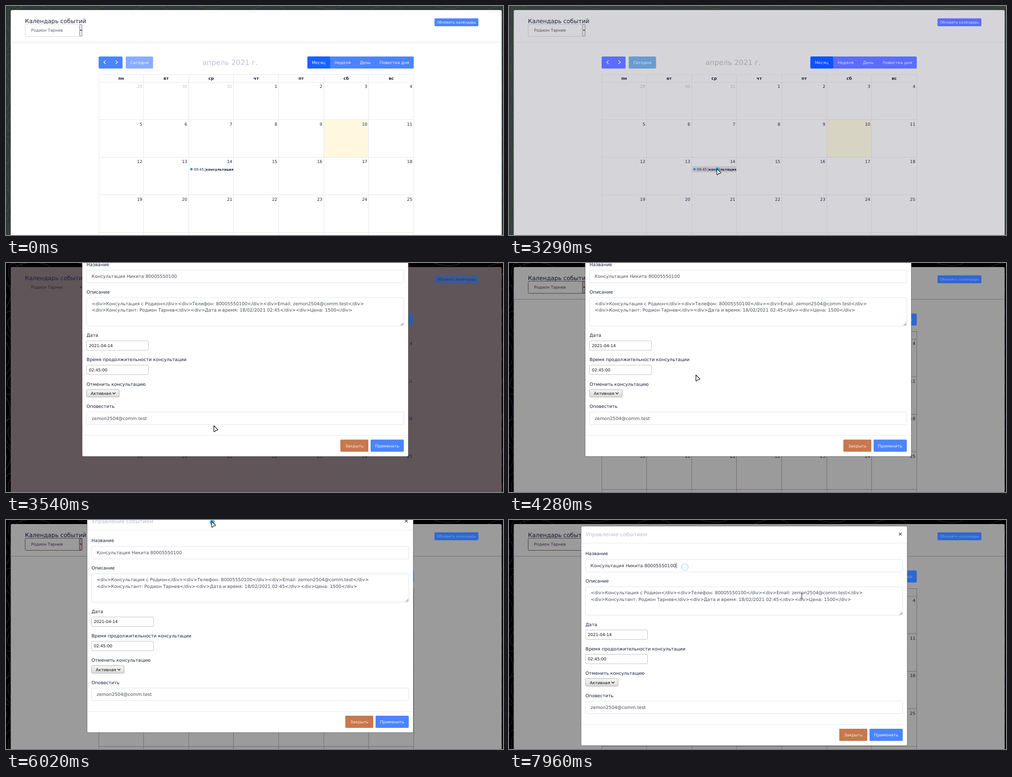
Animation, 1100 px wide and 509 px high, one loop 8000 ms. Source, as an HTML page:

```html
<!DOCTYPE html>
<html lang="ru">
<head>
<meta charset="utf-8">
<title>Календарь событий</title>
<style>
  html, body { margin: 0; width: 100%; height: 100%; overflow: hidden; background: #000; }
  svg { display: block; width: 1100px; height: 509px; }
  text { font-family: "DejaVu Sans", sans-serif; text-rendering: geometricPrecision; white-space: pre; }
  .mid { text-anchor: middle; }
  .end { text-anchor: end; }
  .bold { font-weight: bold; }
</style>
</head>
<body>
<svg id="stage" viewBox="0 0 1100 509"></svg>
<script>
const LOOP = 8000;
const stage = document.getElementById('stage');

const rect = (x1, y1, x2, y2, fill, rest = '') =>
  `<rect x="${x1}" y="${y1}" width="${x2 - x1}" height="${y2 - y1}" fill="${fill}" ${rest}/>`;
const text = (x, y, size, fill, str, rest = '') =>
  `<text x="${x}" y="${y}" font-size="${size}" fill="${fill}" ${rest}>${str.replace(/</g, '&lt;')}</text>`;
const line = (d, stroke, width = 1, rest = '') =>
  `<path d="${d}" fill="none" stroke="${stroke}" stroke-width="${width}" ${rest}/>`;
const range = n => [...Array(n).keys()];

// Page colours as the backdrop fades in
const KEYS = ['bg', 'topo', 'card', 'line', 'text', 'muted', 'btn', 'active', 'off', 'today', 'btext', 'sel', 'box', 'edge', 'knob', 'hover'];
const palette = list => list.split(' ').map(c => '#' + c);
const day = palette('2d3a3a 4c522e ffffff e4e6ee 1c2440 bcc2d4 4c84ff 1a62ff 89adff fff8df eef3ff 555a6a d3d6df 8c8f99 e6e6e8 dedee0');
const dusk = palette('35403f 3f5236 d5d5d9 c5c5cb 1f2440 a2a3a9 596dff 0a52ff 6a9bd0 d7d4c3 d5dcff 4b4c55 b4b4bb 85858c cfcfd3 c4c0c6');
const murky = palette('000000 3a3a4e 605558 605558 1d1c48 4c4450 3a5a96 3a5a96 3a5a96 605558 1f355f 2d2530 605558 605558 605558 605558');
const night = palette('000000 2f2d4a 9b9b9b 75676b 10132e 777777 2d68d2 2258c0 5a8bd0 9b968a 7c9fda 33243c 453c44 453c44 8a7b82 8c8a8d');

function contours() {
  const ring = (cx, cy, rx, ry, tilt) =>
    `<ellipse cx="${cx}" cy="${cy}" rx="${rx}" ry="${ry}" transform="rotate(${tilt} ${cx} ${cy})"/>`;
  const side = range(9).map(i => range(2).map(j =>
    ring(i % 2 ? -12 : 16, 20 + i * 60, 11 + 9 * j, 20 + 14 * j, 25 * Math.sin(i * 2)))).flat();
  const top = range(9).map(i => ring(60 + i * 130, i % 2 ? -8 : 12, 38, 13, 8 * Math.sin(i * 3)));
  const right = range(7).map(i => ring(1106, 30 + i * 78, 8, 32, 10));
  return `<g fill="none" stroke="var(--topo)" stroke-width="0.9">${[...side, ...top, ...right].join('')}</g>`;
}

function page() {
  const colX = i => Math.floor(205 + 99.62 * i) + 0.5;
  const rowY = i => Math.floor(169 + 83.6 * i) + 0.5;
  const days = ['пн', 'вт', 'ср', 'чт', 'пт', 'сб', 'вс'];
  const grid = range(8).map(i => `M${colX(i)} 152.5V509`).join('') + 'M205 152.5H903' +
    range(5).map(i => `M205 ${rowY(i)}H903`).join('');
  const numbers = range(28).map(i => {
    const col = i % 7, row = Math.floor(i / 7);
    return text(301.6 + 99.62 * col, 182 + 83.6 * row, 9.2, i < 3 ? 'var(--muted)' : 'var(--text)',
      String(i < 3 ? 29 + i : i - 2), 'class="end"');
  });
  const tabs = [[692, 'Месяц'], [745, 'Неделя'], [795, 'День'], [859.5, 'Повестка дня']];
  return [
    rect(0, 0, 1100, 509, 'var(--bg)'), contours(),
    rect(10.5, 9, 1097, 520, 'var(--card)', 'rx="3"'),
    line('M10.5 80.5H1097', 'var(--line)'),
    text(42, 38.2, 12.9, 'var(--text)', 'Календарь событий'),
    rect(42.5, 40.5, 168.5, 67.5, 'var(--card)', 'rx="2" stroke="var(--box)"'),
    rect(162.5, 41.5, 168.5, 66.5, 'var(--knob)', 'rx="1" stroke="var(--edge)"'),
    '<path d="M163.7 52.8h4.4l-2.2 2.6z" fill="#111"/>',
    text(55.6, 57, 8.95, 'var(--sel)', 'Родион Тарнев'),
    rect(948.5, 27.5, 1045.5, 45, 'var(--btn)', 'rx="2"'),
    text(997, 39.2, 7.85, 'var(--btext)', 'Обновить календарь', 'class="mid"'),
    rect(205, 112.3, 258, 139, 'var(--btn)', 'rx="2.5"'),
    line('M220.5 121l-4 4l4 4M242.5 121l4 4l-4 4', 'var(--btext)', 1.6),
    rect(265, 112.3, 325.5, 139, 'var(--off)', 'rx="2.5"'),
    text(295.2, 128.6, 9.1, 'var(--btext)', 'Сегодня', 'class="mid"'),
    text(496, 131, 15.8, 'var(--muted)', 'апрель 2021 г.', 'class="mid"'),
    rect(667, 112.3, 902.5, 139, 'var(--btn)', 'rx="2.5"'),
    rect(667, 112.3, 717.5, 139, 'var(--active)', 'rx="2.5"'),
    ...tabs.map(([x, s]) => text(x, 128.6, 9.1, 'var(--btext)', s, 'class="mid"')),
    rect(colX(5), rowY(1), colX(6), rowY(2), 'var(--today)'),
    line(grid, 'var(--line)'),
    ...days.map((d, i) => text(254.8 + 99.62 * i, 163.9, 9.2, 'var(--text)', d, 'class="mid bold"')),
    ...numbers,
    '<clipPath id="cell"><path d="M404 350h98.8v30h-98.8z"/></clipPath><g clip-path="url(#cell)">',
    rect(405.3, 356, 506, 369.7, 'var(--hover)', 'id="hover" rx="2"'),
    '<circle cx="410.4" cy="362.7" r="2.7" fill="#3788d8"/>',
    text(415.5, 365.8, 7.85, 'var(--text)', '09:45'),
    text(439.3, 365.8, 7.85, 'var(--text)', '|'),
    text(442.1, 365.8, 7.7, 'var(--text)', 'консультация', 'class="bold"'),
    '</g>'
  ].join('');
}

function modal() {
  const ink = '#4a4d57', size = 9.96, phone = '80005550100', mail = 'zemon2504@comm.test';
  const labels = [[78.2, 'Название'], [139.1, 'Описание'], [235.7, 'Дата'],
    [289.8, 'Время продолжительности консультации'], [344.2, 'Отменить консультацию'], [393.7, 'Оповестить']];
  const field = (y1, y2, right = 871.5, stroke = '#e0e3ea') =>
    rect(169.5, y1, right, y2, '#fff', `rx="2.5" stroke="${stroke}"`);
  const div = s => `<div>${s}</div>`;
  return [
    '<linearGradient id="grey" x2="0" y2="1"><stop stop-color="#f8f7f6"/><stop offset="1" stop-color="#dad9d9"/></linearGradient>',
    rect(159.5, 13.5, 881.5, 501.5, '#fff', 'rx="3" stroke="#000" stroke-opacity="0.45"'),
    text(169.7, 36.3, 11.6, '#b7bed3', 'Управление событием'),
    line('M863 28.3l6 6m0 -6l-6 6', '#3c4360', 1.4),
    line('M160 51.5H881M160 454.5H881', '#e5e9f2'),
    ...labels.map(([y, s]) => text(169.3, y, size, '#161c38', s)),
    field(87.5, 115.5),
    text(180.6, 104.8, size, ink, `Консультация Никита ${phone}`, 'id="name"'),
    line('M370 95V107.5', '#222', 0.9, 'id="caret"'),
    field(148.5, 211.5),
    text(180.8, 165.1, size, ink, div('Консультация с Родион') + div('Телефон: ' + phone) + div('Email: ' + mail)),
    text(180.8, 179.8, size, ink, div('Консультант: Родион Тарнев') + div('Дата и время: 18/02/2021 02:45') + div('Цена: 1500')),
    line('M864 210.5l6.5 -6.5M866 210.5l4.5 -4.5M868 210.5l2.5 -2.5', '#888', 1),
    field(244.5, 265.5, 306.5, '#c0c0c2'),
    text(174.5, 258, 9.1, '#111', '2021-04-14'),
    field(298.5, 319.5, 306.5, '#c0c0c2'),
    text(174.5, 312.4, 9.1, '#111', '02:45:00'),
    rect(169.5, 352.5, 241.5, 369.5, 'url(#grey)', 'rx="2" stroke="#b0b0b0"'),
    text(178.8, 364.6, 9.05, '#111', 'Активная'),
    line('M227 359.6l3.1 3.2l3.1 -3.2', '#222', 1.4),
    field(402.5, 430.5),
    text(180.8, 420.2, size, ink, mail),
    rect(731, 464, 793, 491, '#c6784e', 'rx="2"'),
    text(762, 481, 9.1, '#f9ebe3', 'Закрыть', 'class="mid"'),
    rect(798, 464, 871.5, 491, '#4c84ff', 'rx="2"'),
    text(834.6, 481, 9.1, '#f2f6ff', 'Применить', 'class="mid"')
  ].join('');
}

const outline = 'fill="#fff" stroke="#111" stroke-width="1.3" stroke-linejoin="round"';
stage.innerHTML = `${page()}<g id="modal">${modal()}</g>
  <circle id="ring" fill="none" stroke="#5cb8ee" stroke-width="1.2"/>
  <g id="cursor">
    <circle id="disc" cx="1.5" cy="2.5" r="5.6" fill="#3da5f5" opacity="0.85"/>
    <path id="arrow" d="M0 0L8.6 8.6Q9 10 7.5 10.2L4.6 10.5L2 13.2Q0.3 14 0 12.4Z" ${outline}/>
    <path id="hand" d="M-1 1Q0.3 -0.6 1.4 1L2.2 5L6.5 6Q8.2 6.6 7.8 8.6L7 13H1L-3.6 8Q-3.4 6.4 -1.8 7L0 8.2Z" ${outline}/>
    <g id="beam">${line('M0 -6V6M-2 -6H2M-2 6H2', '#fff', 2.2)}${line('M0 -6V6M-2 -6H2M-2 6H2', '#333', 1.2)}</g>
  </g>`;
const part = Object.fromEntries([...stage.querySelectorAll('[id]')].map(e => [e.id, e]));

// Tables of [time, ...values], linear between rows
const MODAL = [[3340, 9, -104], [3530, 9, -71.5], [5490, 9, -71.5], [5520, 12, -60], [5800, 25, -45],
  [6020, 20, -29], [6320, 2, 0], [6370, 1, 0], [6540, 1, 0], [6560, 0, 0]];
const SHOW = [[3340, 0], [3530, 1]];
const POINTER = [[500, 500, 343], [700, 482, 328], [1000, 446, 330], [1300, 448, 335], [1600, 456, 356], [1850, 460, 361.5],
  [4040, 460, 361.5], [4300, 410, 240], [4600, 357, 90], [4840, 386, 24], [4880, 388, 20], [5080, 455, -16], [5400, 444, -40]];
const RELEASED = [[6370, 436, 32], [6560, 435, 31.5], [7330, 237, 101], [7620, 385, 104], [7700, 389, 105],
  [7790, 389, 105], [7880, 500, 132], [7960, 648, 169]];
const PRESSES = [[3170, 3320], [5490, 6370], [7680, 7790]];
const RING_MS = 215;

function track(table, t) {
  const next = table.findIndex(row => row[0] > t);
  if (next < 0) return table[table.length - 1].slice(1);
  if (next === 0) return table[0].slice(1);
  const a = table[next - 1], b = table[next], p = (t - a[0]) / (b[0] - a[0]);
  return a.slice(1).map((v, i) => v + (b[i + 1] - v) * p);
}

function pointerAt(t) {
  if (t >= 6370) return track(RELEASED, t);
  if (t < 5490) return track(POINTER, t);
  const [dx, dy] = track(MODAL, t);
  return [435 + dx, 31.5 + dy];
}

function paint(t) {
  let from = day, to = dusk, p = track([[3170, 0], [3290, 1]], t)[0];
  if (t >= 3340) [from, to, p] = [dusk, night, track([[3340, 0], [3530, 1]], t)[0]];
  if (t >= 3530 && t < 3600) from = to = murky;
  KEYS.forEach((key, i) =>
    stage.style.setProperty('--' + key, `color-mix(in srgb, ${to[i]} ${p * 100}%, ${from[i]})`));
}

const show = (name, on) => part[name].setAttribute('visibility', on ? 'inherit' : 'hidden');
const move = (name, [x, y]) => part[name].setAttribute('transform', `translate(${x} ${y})`);

function render(t) {
  paint(t);
  move('modal', track(MODAL, t));
  part.modal.setAttribute('opacity', track(SHOW, t)[0]);
  part.name.setAttribute('fill', t >= 7330 ? '#2b2e37' : '#4a4d57');
  show('caret', t >= 7790);
  show('hover', t >= 1600);

  const onEvent = t >= 1600 && t < 3230, inField = t >= 7180;
  move('cursor', pointerAt(t));
  show('cursor', t >= 500);
  show('hand', t >= 500 && onEvent);
  show('beam', inField);
  show('arrow', t >= 500 && !onEvent && !inField);
  show('disc', PRESSES.some(([down, up]) => t >= down && t < up));

  const press = PRESSES.find(([, up]) => t >= up && t < up + RING_MS);
  show('ring', press);
  if (press) {
    const p = (t - press[1]) / RING_MS, [x, y] = pointerAt(press[1]);
    const shift = inField ? [0, 0] : [1.5, 2.5];
    move('ring', [x + shift[0], y + shift[1]]);
    part.ring.setAttribute('r', 5 + 3.2 * p);
    part.ring.setAttribute('opacity', 1 - 0.6 * p);
  }
}

const start = performance.now();
function frame() {
  render((performance.now() - start) % LOOP);
  requestAnimationFrame(frame);
}
frame();
</script>
</body>
</html>
```
